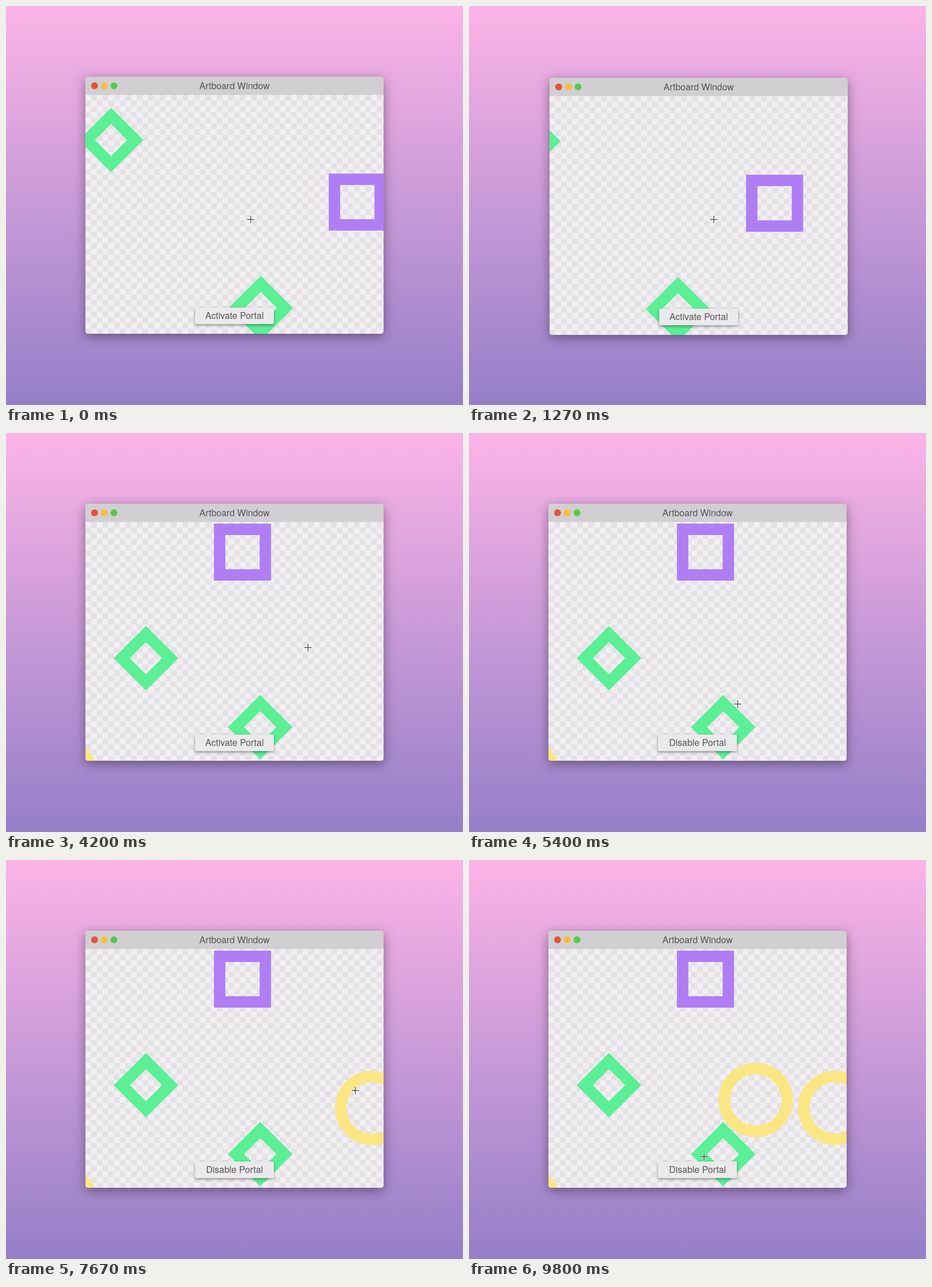
Animation of 800x700 px, one loop 9.87 s. Source, as an HTML page with a canvas:

```html
<!DOCTYPE html>
<html lang="en">
<head>
<meta charset="utf-8">
<title>Artboard Window</title>
<style>
html, body { margin: 0; width: 100%; height: 100%; overflow: hidden; }
canvas { display: block; }
</style>
</head>
<body>
<canvas id="stage" width="800" height="700"></canvas>
<script>
const ctx = document.getElementById('stage').getContext('2d');
const LOOP = 9870, STEP = 200 / 3;
const FONT = '16px "Helvetica Neue", "Liberation Sans", Arial, sans-serif';
const WIN = { x: 139, y: 124, w: 522, h: 451, bar: 32 };
const PORTAL_ON = 5000;
const GREEN = '#5bef96', PURPLE = '#b07ef4', YELLOW = '#fce683', INK = '#545355';

// [kind, x, y]: squares by top left corner, the others by centre
const SHAPES = [
  ['diamond', 184, 235], ['square', 565, 294], ['diamond', 446, 530],
  ['diamond', 646, 651], ['circle', 297, 736]
];

const MENU_GROUPS = [
  ['Add Shape: Square', 'Add Shape: Circle', 'Add Shape: Diamond'],
  ['Fake Menu Item: Foo', 'Fake Menu Item: Bar'],
  ['Fake Menu Item: Bat', 'Fake Menu Item: Bin', 'Fake Menu Item: Foe'],
  ['Fake Menu Item: Fat', 'Fake Menu Item: Bot']
];
const ROW = 28, GAP = 17, MENU_W = 250, MENU_H = 331;
// Each menu leaves a circle at its corner when it closes
const MENUS = [
  { x: 576, y: 370, open: 6190, close: 7460 },
  { x: 437, y: 356, open: 8460, close: 9060 }
];

const smooth = u => u * u * (3 - 2 * u);
const easeOut = u => u * (2 - u);
const linear = u => u;

// [time, x, y, easing into this point]
const PAN = [[0, 0, 0], [1267, -82, 0, linear], [2010, -201, -135, easeOut]];
const POINTER = [
  [0, 428, 374], [2010, 428, 374], [2195, 623, 382], [2400, 623, 382],
  [2730, 256, 348], [2810, 256, 348], [3330, 600, 381], [3740, 600, 381],
  [4200, 528, 376], [4730, 400, 543], [5000, 400, 543], [5930, 576, 370],
  [6400, 576, 370], [6460, 581, 371], [6530, 581, 371], [7000, 640, 590],
  [7400, 640, 412], [7460, 640, 412], [8330, 437, 356], [8470, 437, 356],
  [8720, 454, 374], [8760, 454, 374], [8960, 480, 398], [9060, 480, 398],
  [9400, 470, 420], [9790, 411, 520]
];

function along(keys, t) {
  const i = keys.findIndex(k => k[0] > t);
  if (i < 0) return keys[keys.length - 1].slice(1, 3);
  const a = keys[i - 1], b = keys[i];
  const u = (b[3] || smooth)((t - a[0]) / (b[0] - a[0]));
  return [1, 2].map(n => Math.round(a[n] + (b[n] - a[n]) * u));
}

const inside = (x, y, l, t, w, h) => x >= l && y >= t && x < l + w && y < t + h;

function text(str, x, y, color, align) {
  ctx.font = FONT;
  ctx.textAlign = align;
  ctx.fillStyle = color;
  ctx.fillText(str, x, y);
}

function roundBox(x, y, w, h, r) {
  ctx.beginPath();
  ctx.roundRect(x, y, w, h, r);
}

function panel(x, y, w, h, r, color, shadow, blur, drop) {
  ctx.save();
  ctx.shadowColor = shadow;
  ctx.shadowBlur = blur;
  ctx.shadowOffsetY = drop;
  ctx.fillStyle = color;
  roundBox(x, y, w, h, r);
  ctx.fill();
  ctx.restore();
}

function dot(x, y, r, color) {
  ctx.fillStyle = color;
  ctx.beginPath();
  ctx.arc(x, y, r, 0, Math.PI * 2);
  ctx.fill();
}

function drawShape([kind, x, y]) {
  ctx.save();
  ctx.translate(x, y);
  ctx.lineWidth = 20;
  ctx.beginPath();
  if (kind === 'circle') {
    ctx.strokeStyle = YELLOW;
    ctx.arc(0, 0, 55, 0, Math.PI * 2);
  } else if (kind === 'square') {
    ctx.strokeStyle = PURPLE;
    ctx.rect(10, 10, 80, 80);
  } else {
    ctx.strokeStyle = GREEN;
    ctx.rotate(Math.PI / 4);
    ctx.rect(-30, -30, 60, 60);
  }
  ctx.stroke();
  ctx.restore();
}

function drawBackdrop() {
  const g = ctx.createLinearGradient(0, 0, 0, 700);
  g.addColorStop(0, '#fbb4e7');
  g.addColorStop(1, '#957fc8');
  ctx.fillStyle = g;
  ctx.fillRect(0, 0, 800, 700);
}

function drawChecker() {
  const { x, y, w, h, bar } = WIN;
  ctx.fillStyle = '#f1eff1';
  ctx.fillRect(x, y + bar, w, h - bar);
  ctx.fillStyle = '#e4e2e5';
  for (let r = 0; r * 10 < h - bar; r++)
    for (let c = (r + 1) % 2; c * 10 < w; c += 2)
      ctx.fillRect(x + c * 10, y + bar + r * 10, 10, 10);
}

function drawWindow(t) {
  const { x, y, w, h, bar } = WIN;
  const nudge = Math.round(2 * Math.exp(-(((t - 1400) / 620) ** 2)));
  ctx.save();
  ctx.translate(nudge, nudge);
  panel(x, y, w, h, 5, '#f1eff1', 'rgba(0,0,0,.4)', 20, 5);

  ctx.save();
  roundBox(x, y, w, h, 5);
  ctx.clip();
  drawChecker();
  const [px, py] = along(PAN, t);
  SHAPES.forEach(([kind, sx, sy]) => drawShape([kind, sx + px, sy + py]));
  MENUS.filter(m => t >= m.close)
    .forEach(m => drawShape(['circle', m.x + 65, m.y + 65]));
  ctx.fillStyle = '#d1cfd1';
  ctx.fillRect(x, y, w, bar);
  ctx.restore();

  ['#e6503c', '#fabd38', '#55c94b'].forEach((c, i) => dot(155 + 17 * i, 140, 6, c));
  text('Artboard Window', 400, 146, INK, 'center');

  panel(331, 529, 138, 29, 3, '#ebe9ec', 'rgba(0,0,0,.4)', 5, 2);
  text(t < PORTAL_ON ? 'Activate Portal' : 'Disable Portal', 400, 549, INK, 'center');
  ctx.restore();
}

function drawMenu({ x, y }, mx, my) {
  panel(x, y, MENU_W, MENU_H, 4, '#ebe9ec', 'rgba(0,0,0,.45)', 16, 4);
  ctx.save();
  roundBox(x, y, MENU_W, MENU_H, 4);
  ctx.clip();
  let top = y;
  MENU_GROUPS.forEach((group, i) => {
    if (i) {
      ctx.fillStyle = '#c5c3c6';
      ctx.fillRect(x, top + 8, MENU_W, 1);
      top += GAP;
    }
    group.forEach(label => {
      const hot = inside(mx, my, x, top, MENU_W, ROW);
      if (hot) {
        ctx.fillStyle = '#3aa9f2';
        ctx.fillRect(x, top, MENU_W, ROW);
      }
      text(label, x + 24, top + 20, hot ? '#fff' : INK, 'left');
      top += ROW;
    });
  });
  ctx.restore();
}

function drawCross(x, y) {
  ctx.fillStyle = 'rgba(255,255,255,.6)';
  ctx.fillRect(x - 7, y - 1, 15, 3);
  ctx.fillRect(x - 1, y - 7, 3, 15);
  ctx.fillStyle = '#222';
  ctx.fillRect(x - 6, y, 13, 1);
  ctx.fillRect(x, y - 6, 1, 13);
}

const HAND = new Path2D(
  'M3.5 2.2Q3.8 .6 5.2 1Q6.3 1.4 6.6 3L7.3 6.2Q8.5 5 9.6 6.3Q10.8 5.4 11.8 6.8' +
  'Q13.6 6 14.2 8.2Q15 11 13.7 13.5V16.8H6.6Q5.8 14.8 3.6 12.5L1.2 9.8' +
  'Q.8 8.4 2.3 8.2Q3.6 8.4 4.8 9.8Z');
const FINGERS = new Path2D('M8.1 11.3V14M10 11.3V14M11.9 11.3V14');

function drawHand(x, y) {
  ctx.save();
  ctx.translate(x - 5, y - 1);
  ctx.fillStyle = '#fff';
  ctx.strokeStyle = '#111';
  ctx.lineJoin = 'round';
  ctx.lineWidth = 1.2;
  ctx.fill(HAND);
  ctx.stroke(HAND);
  ctx.lineWidth = 0.8;
  ctx.stroke(FINGERS);
  ctx.restore();
}

function draw(t) {
  const [mx, my] = along(POINTER, t);
  const menu = MENUS.find(m => t >= m.open && t < m.close);
  drawBackdrop();
  drawWindow(t);
  if (menu) drawMenu(menu, mx, my);
  const hand = menu ? inside(mx, my, menu.x, menu.y, MENU_W, MENU_H)
                    : inside(mx, my, 331, 529, 138, 29);
  (hand ? drawHand : drawCross)(mx, my);
}

const start = performance.now();
function tick() {
  const t = (performance.now() - start) % LOOP;
  draw(Math.floor((t + 4) / STEP) * STEP);
  requestAnimationFrame(tick);
}
tick();
</script>
</body>
</html>
```
